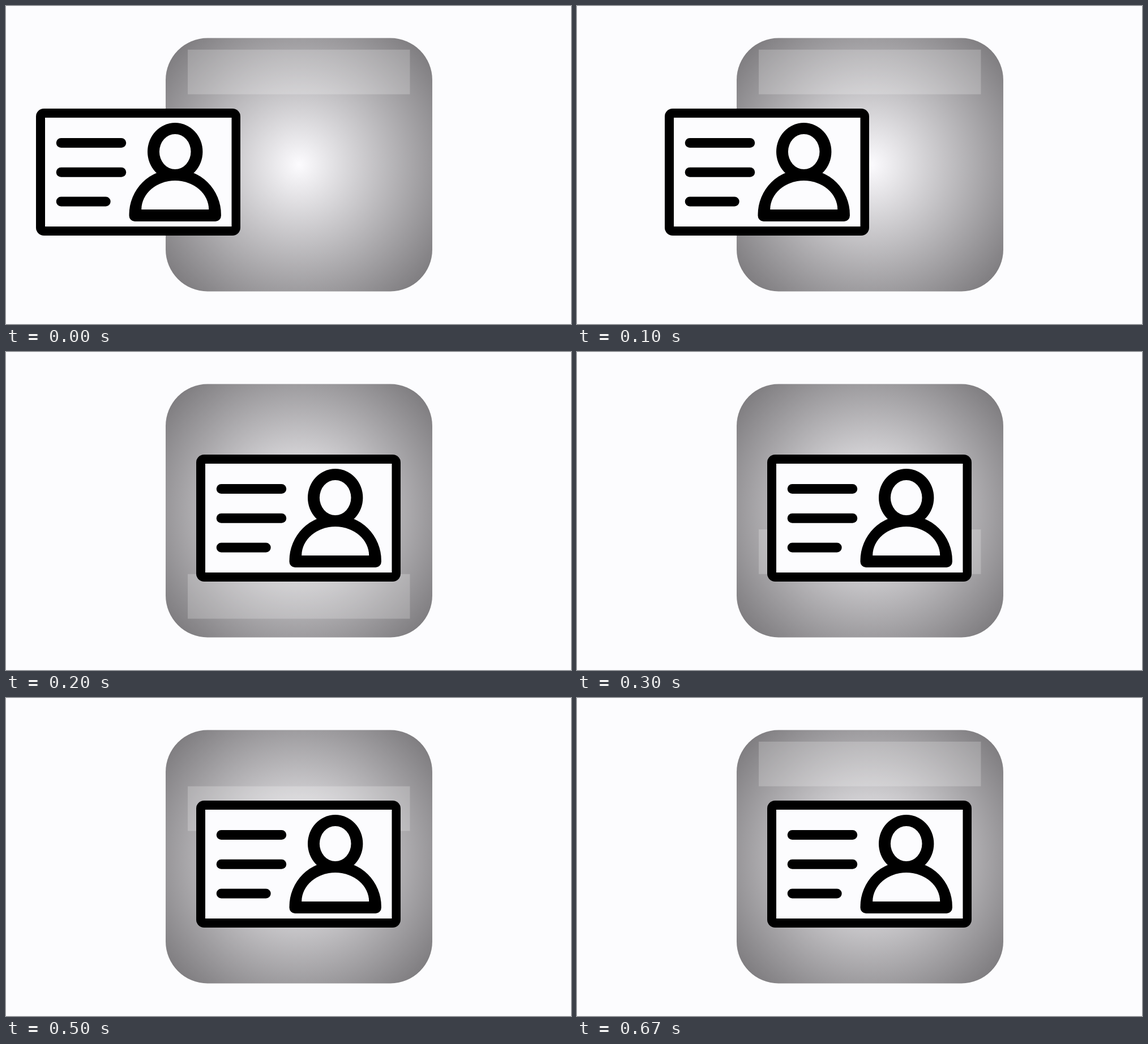
Recreate the animation shown at these times as an HTML page with a canvas. Size 998 by 561 pixels, loop 710 ms.

```html
<!DOCTYPE html>
<html lang="en">
<head>
<meta charset="utf-8">
<title>Card scan</title>
<style>
html, body { margin: 0; width: 100%; height: 100%; overflow: hidden; background: #fcfcfe; }
canvas { display: block; }
</style>
</head>
<body>
<canvas id="stage" width="998" height="561"></canvas>
<script>
const ctx = document.getElementById('stage').getContext('2d');
const PAPER = '#fcfcfe';
const LOOP = 710;
const POSE_TIME = 100;
const LAST_POSE = 6;
const CARD_STOPS = [0, 102, 283];
const ROWS = 5;
const ROW_HEIGHT = 78.7;

const glow = ctx.createRadialGradient(517.5, 280, 0, 517.5, 280, 324);
glow.addColorStop(0, '#fcfbfe');
glow.addColorStop(1, '#737174');

function roundRect(x, y, w, h, r, color) {
  ctx.fillStyle = color;
  ctx.beginPath();
  ctx.roundRect(x, y, w, h, r);
  ctx.fill();
}

function oval(x, y, rx, ry, color) {
  ctx.fillStyle = color;
  ctx.beginPath();
  ctx.ellipse(x, y, rx, ry, 0, 0, Math.PI * 2);
  ctx.fill();
}

function drawPerson() {
  const x = 298.7;
  oval(x, 257, 48.7, 51, '#000');

  ctx.beginPath();
  ctx.ellipse(x, 368, 81.2, 80.5, 0, Math.PI, 0);
  ctx.arcTo(x + 81.2, 380, x, 380, 10);
  ctx.arcTo(x - 81.2, 380, x - 81.2, 368, 10);
  ctx.closePath();
  ctx.fill();

  oval(x, 257, 27.8, 31, PAPER);
  ctx.beginPath();
  ctx.ellipse(x, 359, 59.5, 51, 0, Math.PI, 0);
  ctx.fill();
}

function drawCard(offset) {
  ctx.save();
  ctx.translate(offset, 0);
  roundRect(53, 181, 361, 224, 14, '#000');
  roundRect(69, 197, 329.5, 192, 0, PAPER);
  [123.5, 123.5, 96].forEach((width, i) =>
    roundRect(88.7, 233 + i * 51.8, width, 17, 8.5, '#000'));
  drawPerson();
  ctx.restore();
}

// The card arrives in three jumps, then the band climbs one row per pose.
function draw(time) {
  const pose = Math.min(Math.floor((time % LOOP) / POSE_TIME), LAST_POSE);
  const row = pose < 2 ? 0 : ROWS + 1 - pose;

  ctx.fillStyle = PAPER;
  ctx.fillRect(0, 0, 998, 561);
  roundRect(282, 56.5, 471, 447, 74, glow);
  roundRect(321, 77 + row * ROW_HEIGHT, 392.5, ROW_HEIGHT, 0, 'rgba(255,255,255,0.21)');
  drawCard(CARD_STOPS[Math.min(pose, CARD_STOPS.length - 1)]);
}

let start;
function tick(now) {
  start ??= now;
  draw(now - start);
  requestAnimationFrame(tick);
}
draw(0);
requestAnimationFrame(tick);
</script>
</body>
</html>
```
